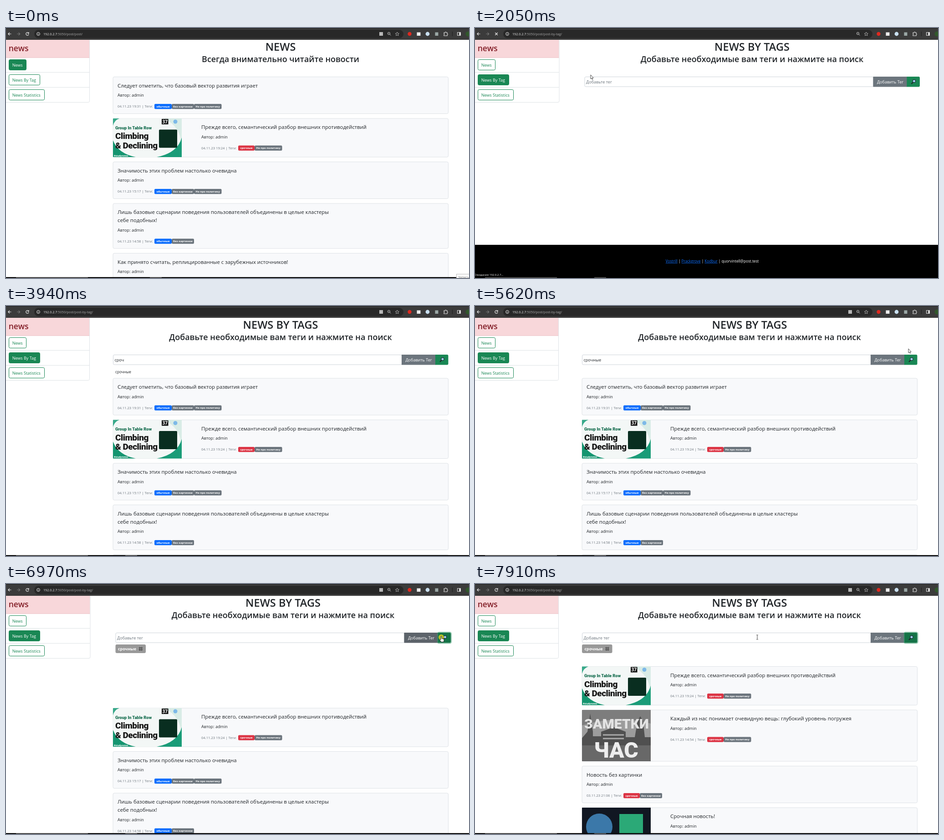
Recreate the animation shown at these times as an HTML page. Size 1017 by 550 pixels, loop 8 s.

```html
<!DOCTYPE html>
<html lang="ru">
<head>
<meta charset="utf-8">
<title>News by tags</title>
<style>
  html, body { margin: 0; width: 100%; height: 100%; overflow: hidden; background: #fff; }
  svg { display: block; width: 1017px; height: 550px; font-family: "Open Sans", "Noto Sans", sans-serif; }
  text { white-space: pre; }
  .poster { font-family: Roboto, sans-serif; font-weight: 900; }
</style>
</head>
<body>
<svg id="stage" viewBox="0 0 1017 550"></svg>
<script>
const LOOP = 8000;
const INK = '#212529', GREY = '#6c757d', GREEN = '#198754', LINE = '#dee2e6';
const HOST = '192.0.2.7', ROOT = ':5050/post/';

// Moments of the story, in ms
const STATUS = 900, LINK_CLICK = 1000, OPEN = 1420, LOADED = 2330;
const ADDED = 6170, SEARCH = 6930, CLEARED = 7010, FOUND = 7130;
const CLICKS = [[1000, 1110], [2640, 2770], [6080, 6190], [6930, 7030]];
const TYPED = [[3460, 'с'], [3610, 'ср'], [3810, 'сро'], [3940, 'сроч'], [4810, 'срочные'], [ADDED, '']];
const POINTER = [
  [70, 1010, 546], [430, 480, 300], [800, 55, 117], [1420, 54, 116], [2050, 254, 103], [2120, 257, 104],
  [2330, 262, 107], [2540, 291, 118], [4490, 291, 118], [4530, 290, 118], [4670, 288, 120],
  [4810, 262, 135], [4950, 264, 135], [5480, 945, 80], [5620, 952, 94], [5760, 952, 95],
  [6000, 906, 115], [6240, 906, 115], [6520, 956, 115], [7110, 956, 115],
  [7500, 642, 102], [7570, 640, 103], [7910, 620, 117]
];

const BADGES = {
  'обычные': [38, '#0d6efd'], 'срочные': [36, '#dc3545'],
  'без картинки': [49, GREY], 'Не про политику': [60.5, GREY]
};
const FIRST = { title: ['Следует отметить, что базовый вектор развития играет'], date: '04.11.23 19:31',
  tags: ['обычные', 'без картинки', 'Не про политику'] };
const LESSON = { title: ['Прежде всего, семантический разбор внешних противодействий'], date: '04.11.23 19:24',
  tags: ['срочные', 'Не про политику'], art: lessonArt, height: 85.5 };
const ALL_NEWS = [
  FIRST, LESSON,
  { title: ['Значимость этих проблем настолько очевидна'], date: '04.11.23 15:17',
    tags: ['обычные', 'без картинки', 'Не про политику'] },
  { title: ['Лишь базовые сценарии поведения пользователей объединены в целые кластеры', 'себе подобных!'],
    date: '04.11.23 14:58', tags: ['обычные', 'без картинки'], height: 99.5 },
  { title: ['Как принято считать, реплицированные с зарубежных источников!'], date: '04.11.23 14:56',
    tags: ['обычные'] }
];
const URGENT_NEWS = [
  LESSON,
  { title: ['Каждый из нас понимает очевидную вещь: глубокий уровень погружея'], date: '04.11.23 14:54',
    tags: ['срочные', 'Не про политику'], art: reelArt, height: 113.5 },
  { title: ['Новость без картинки'], date: '03.11.23 21:06', tags: ['срочные', 'без картинки'] },
  { title: ['Срочная новость!'], date: '03.11.23 20:40', tags: ['срочные'], art: codeArt, height: 85.5 }
];

const rect = (x, y, w, h, fill, extra = '') =>
  `<rect x="${x}" y="${y}" width="${w}" height="${h}" fill="${fill}" ${extra}/>`;
const circle = (x, y, r, fill, extra = '') => `<circle cx="${x}" cy="${y}" r="${r}" fill="${fill}" ${extra}/>`;
const path = (d, stroke, width = 1, fill = 'none') =>
  `<path d="${d}" stroke="${stroke}" stroke-width="${width}" fill="${fill}"/>`;
const shape = (d, fill) => path(d, 'none', 0, fill);
const text = (x, y, size, content, fill = INK, extra = '') =>
  `<text x="${x}" y="${y}" font-size="${size}" fill="${fill}" ${extra}>${content}</text>`;
const group = (x, y, content) => `<g transform="translate(${x} ${y})">${content}</g>`;
const MIDDLE = 'text-anchor="middle" ', BOLD = 'font-weight="700" ', SEMI = 'font-weight="600" ';
const POSTER = 'class="poster" ', TIGHT = 'letter-spacing="-.5" ';

function lessonArt() {
  return rect(0, 0, 151, 85, '#f3f7f6') +
    shape('M112 0Q150 18 151 62V0Z', '#d9ece6') +
    shape('M0 48Q12 78 50 85H0Z', '#159570') +
    shape('M151 42Q142 76 96 85H151Z', '#1a9c78') +
    shape('M0 0H14Q3 4 0 16Z', '#38a98a') +
    text(5, 23.5, 9.2, 'Group In Table Row', '#126b4c', POSTER) +
    text(5, 45, 19, 'Climbing', '#181818', POSTER + TIGHT) +
    text(5, 65.5, 19, '&amp; Declining', '#181818', POSTER + TIGHT) +
    rect(101, 24.5, 40, 40, '#092e20', 'rx="2"') +
    rect(107, 1, 14.5, 12, '#111') + text(114.2, 10.8, 10, '37', '#fff', MIDDLE + BOLD) +
    circle(137, 7, 4.5, '#7db9e8') +
    text(2, 83.5, 5, '#studynotes', '#fff', BOLD);
}

function reelArt() {
  return rect(0, 0, 151, 113, '#9c9c9c') +
    shape('M0 0H151V30Q80 10 0 34Z', '#7d7d7d') +
    shape('M0 113V62L12 48 18 8 24 48V58H42V48L70 38 96 48V60H116L122 24 128 14 134 24 138 60H151V113Z', '#505050') +
    shape('M0 78H151V113H0Z', '#686868') +
    path('M46 55H92M46 63H92', '#aaa', 3) +
    text(76, 41, 30, 'ЗАМЕТКИ', '#e4e4e4', MIDDLE + POSTER) +
    text(75, 105, 48, 'ЧАС', '#eee', MIDDLE + POSTER);
}

function codeArt() {
  return rect(0, 0, 151, 85, '#111722') + circle(38, 42, 29, '#3b78a9') + rect(82, 14, 52, 52, '#2ba977');
}

function card(item, y) {
  const h = item.height || 81.5, x = item.art ? 429 : 245, drop = (item.title.length - 1) * 18;
  let out = rect(235, y + .5, 736.5, h - .5, '#f8f9fb', `rx="3" stroke="${LINE}"`);
  if (item.art) out += group(235, y + .5, item.art());
  item.title.forEach((line, i) => out += text(x, y + 23.8 + i * 18, 11.35, line));
  out += text(x, y + 44 + drop, 9.1, 'Автор: admin') +
    text(x, y + 68.3 + drop, 7.6, item.date + ' | Теги:', GREY);
  let left = x + 81;
  for (const tag of item.tags) {
    const [w, fill] = BADGES[tag];
    out += rect(left, y + 60 + drop, w, 11.2, fill, 'rx="2.3"') +
      text(left + w / 2, y + 67.9 + drop, 6, tag, '#fff', MIDDLE + BOLD);
    left += w;
  }
  return out;
}

function cards(items, y) {
  return items.map(item => {
    const drawn = item.hidden ? '' : card(item, y);
    y += (item.height || 81.5) + 10;
    return drawn;
  }).join('');
}

function toolbar(url, loading, translatable) {
  const light = '#e8e8e8', soft = '#b8b8b8';
  return rect(0, 0, 1017, 26, '#3b3b3b') + rect(0, 0, 1017, 1, '#1c1c1c') +
    rect(62, 4, 811, 18.5, '#282828', 'rx="9.2"') +
    path('M11.5 13H5M8 9.8 4.8 13 8 16.2', light, 1.2) +
    path('M24 13H30.5M27.5 9.8 30.7 13 27.5 16.2', '#777', 1.2) +
    (loading ? path('M44.2 10.2 49.8 15.8M49.8 10.2 44.2 15.8', light, 1.3)
      : path('M49.6 11.2A3.2 3.2 0 1 0 50 14M50 9.3V11.8H47.4', light, 1.2)) +
    circle(71, 13, 3.4, 'none', `stroke="${light}"`) + path('M71 12.5V15M71 11V11.7', light) +
    text(82, 15.8, 7.2, `<tspan fill="#f1f1f1">${HOST}</tspan>${url}`, '#aaa') +
    (translatable ? rect(820, 9, 8, 8, soft) : '') +
    circle(841, 12, 2.7, 'none', `stroke="${soft}"`) + path('M843 14 845.5 16.5M839.8 12H842.2', soft) +
    path('M859.3 9 860.5 11.7 863.3 12 861.2 13.9 861.9 16.8 859.3 15.3 856.7 16.8 857.4 13.9 855.3 12 858.1 11.7Z', soft, .9) +
    circle(886.5, 13, 4.2, '#e0291f') + rect(902.5, 9.5, 8, 7.5, '#ededed') +
    circle(926, 13, 4.4, '#c9dff0') + rect(942.5, 9.5, 7, 7.5, '#9aa7a5') +
    path('M962 10.2H964.4A1.4 1.4 0 0 1 967.2 10.2H969.2V12.3A1.4 1.4 0 0 1 969.2 15V17H962V14.8A1.3 1.3 0 0 0 962 12.3Z', light, 1.1) +
    rect(980, 8, 1, 10, '#1d1d1d') + rect(991.5, 9.8, 7, 6.5, 'none', `stroke="${light}"`) +
    rect(995.5, 9.8, 3, 6.5, light) + circle(1015, 13, 5.5, '#31572c');
}

function navButton(y, width, label, filled, ring) {
  return rect(6.5, y + .5, width - 1, 23, filled ? GREEN : '#fff', `rx="2.8" stroke="${GREEN}"`) +
    (ring ? rect(5, y - 1, width + 2, 26, 'none', 'rx="4" stroke="#3c996e" stroke-opacity=".5" stroke-width="2.4"') : '') +
    text(13.7, y + 15.5, 9, label, filled ? '#fff' : GREEN);
}

function sidebar(width, onTags, hover, focused) {
  return rect(0, 26, width, 39, '#f8d7da') + path(`M0 65.2H${width}`, '#eabfc4') +
    path(`M0 97.5H${width}M0 130.5H${width}M0 163.5H${width - 2.5}Q${width + .5} 163.5 ${width + .5} 160.5V26`, LINE) +
    text(5.7, 51, 17.6, 'news', '#842029', SEMI) +
    navButton(69, 39, 'News', !onTags) +
    navButton(102, 69, 'News By Tag', onTags || hover, focused) +
    navButton(135, 79, 'News Statistics');
}

function heading(center, title, subtitle) {
  return text(center, 50.3, 23.5, title, INK, MIDDLE + SEMI) +
    text(center, 74.5, 17.95, subtitle, INK, MIDDLE + SEMI);
}

function searchForm(x, s) {
  const tagChip = rect(0, 26, 66.5, 19, '#999', 'rx="3"') + text(5.5, 38.8, 8.9, 'срочные', '#fff', BOLD) +
    path('M52.2 32.5 58.6 38.9M58.6 32.5 52.2 38.9', '#333', 3) +
    path('M52.6 32.9 58.2 38.5M58.2 32.9 52.6 38.5', '#ccc', 1);
  return group(x, 107, rect(.5, .5, 634, 21.5, '#fff', 'rx="2.5" stroke="#ced4da"') +
    text(3.5, 15, 9.05, s.typed || 'Добавьте тег', s.typed ? INK : GREY) +
    rect(634, 0, 74.5, 22.5, s.addDark ? '#5c636a' : GREY) +
    text(671.5, 15, 9.05, 'Добавить Тег', '#fff', MIDDLE) +
    shape('M708 0H734Q736.5 0 736.5 3V19.5Q736.5 22.5 734 22.5H708Z', s.searchDark ? '#157347' : GREEN) +
    (s.ring ? rect(707.5, -.8, 30, 24.2, 'none', 'rx="3.5" stroke="#3c996e" stroke-opacity=".5" stroke-width="2.4"') : '') +
    path('M722 12 718 16', '#20242a', 2.2) + circle(724, 9.8, 3.1, '#9fd0f3', 'stroke="#22303a" stroke-width="1.2"') +
    (s.tagged ? tagChip : '') +
    (s.suggest ? text(5, 41, 8.2, 'срочные') : ''));
}

function footer() {
  const link = name => `<tspan fill="#0d6efd" text-decoration="underline">${name}</tspan>`;
  return rect(0, 477, 1017, 73, '#000') +
    text(521, 515.8, 8.2, ['Vostrill', 'Prackgrove', 'Kodbur'].map(link).join(' | ') +
      ' | quorvintell@post.test', '#fff', MIDDLE);
}

function pointerAt(t) {
  const next = POINTER.findIndex(k => k[0] > t);
  if (next < 0) return POINTER.at(-1).slice(1);
  const [t0, x0, y0] = POINTER[next - 1], [t1, x1, y1] = POINTER[next];
  const f = (t - t0) / (t1 - t0), e = f * f * (3 - 2 * f);
  return [x0 + (x1 - x0) * e, y0 + (y1 - y0) * e];
}

function pointer(x, y, kind) {
  const kinds = {
    arrow: path('M0 0V9L2 7.3 3.4 10.3 4.8 9.7 3.4 6.8H6.2Z', '#222', .8, '#fff'),
    hand: path('M-1 .5Q0-.8 1 .5V5L5 6Q6.4 6.5 6.2 8L5.3 12.5H0L-3.6 7.8Q-3 6.3-1.6 7.4L-1 8Z', '#222', .9, '#fff'),
    beam: path('M-2-5H-.5L0-4.5.5-5H2M0-4.5V4.5M-2 5H-.5L0 4.5.5 5H2', '#333', .9)
  };
  return group(x.toFixed(2), y.toFixed(2), kinds[kind]);
}

function scene(t) {
  const between = (a, b) => t >= a && t < b;
  const onTags = t >= OPEN, opening = between(OPEN, LOADED);
  const wide = opening || between(SEARCH, FOUND);
  const empty = opening || between(CLEARED, FOUND);
  const shown = between(70, 3460) || t >= 4490;
  const [x, y] = t < 70 ? [1030, 560] : pointerAt(t);
  const over = (left, top, right, bottom) => x >= left && x <= right && y >= top && y <= bottom;
  const overLink = over(6, 103, 75, 126);
  const overInput = onTags && over(235, 108, 868, 130);
  const overAdd = onTags && over(869, 107, 942, 130), overSearch = onTags && over(943, 107, 977, 130);
  const clicking = CLICKS.some(([a, b]) => between(a, b));

  let out = rect(0, 0, 1017, 550, '#fff') +
    sidebar(wide ? 184.5 : 183, onTags, overLink, between(LINK_CLICK, OPEN));
  if (onTags) {
    const tagged = t >= ADDED;
    const typed = TYPED.filter(k => t >= k[0]).at(-1)?.[1];
    out += heading(wide ? 608.5 : 603, 'NEWS BY TAGS', 'Добавьте необходимые вам теги и нажмите на поиск') +
      searchForm(wide ? 240.5 : 235, {
        typed, tagged, suggest: between(3460, 4950),
        addDark: overAdd || between(6080, CLEARED),
        searchDark: overSearch || t >= SEARCH, ring: t >= SEARCH
      });
    const top = tagged ? 181 : 158.5;
    if (empty) out += footer();
    else if (t >= FOUND) out += cards(URGENT_NEWS, top);
    else out += cards(t < SEARCH ? ALL_NEWS : [{ hidden: true }, ...ALL_NEWS.slice(1)], top);
  } else {
    out += heading(603, 'NEWS', 'Всегда внимательно читайте новости') + cards(ALL_NEWS, 107);
  }

  out += toolbar(ROOT + (onTags ? 'post-by-tag/' : 'post/'), between(1080, LOADED), !opening);
  if (between(STATUS, OPEN)) {
    out += rect(-3, 536.5, 105, 12, '#000', 'rx="2"') + text(-1.5, 544.6, 6.3, HOST + ROOT + 'post-by-tag/', '#fff');
  } else if (opening) {
    out += text(-1, 544.6, 6.1, `Ожидание ${HOST}...`, '#fff');
  }
  out += rect(0, 548, 1017, 2, '#000') + rect(22, 548, 158, 2, '#444') +
    rect(t < STATUS ? 316 : 262, 548, 26, 2, '#444');
  if (t < 70) {
    out += rect(989.5, 541.5, 30, 12, '#fff', 'stroke="#bbb"') + text(993, 551, 7, 'Запись', '#666');
  }
  if (clicking) out += circle(x, overInput ? y : y + 2, 6, '#f2dc1c', 'fill-opacity=".75"');
  if (shown) out += pointer(x, y, overInput ? 'beam' : overLink || overAdd || overSearch ? 'hand' : 'arrow');
  return out;
}

const stage = document.getElementById('stage');
let last = '';
function tick() {
  const picture = scene(performance.now() % LOOP);
  if (picture !== last) stage.innerHTML = last = picture;
  requestAnimationFrame(tick);
}
tick();
</script>
</body>
</html>
```
